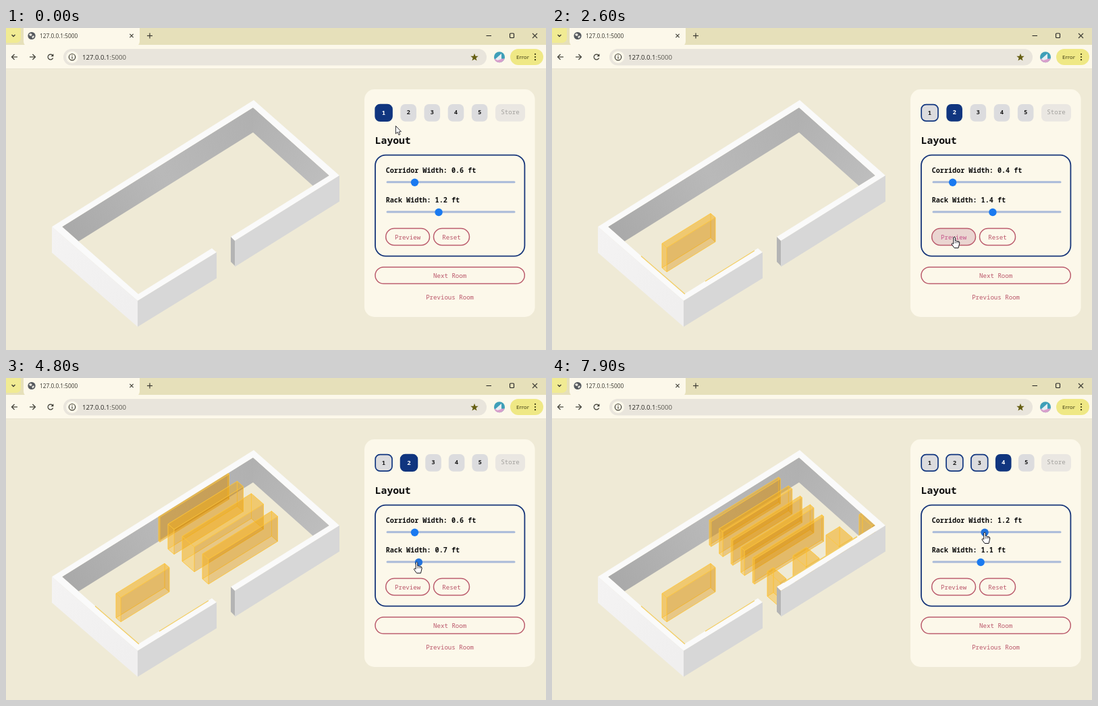
Recreate the animation shown at these times as an HTML page with a canvas. Size 800 by 478 pixels, loop 8 s.

```html
<!DOCTYPE html>
<html lang="en">
<head>
<meta charset="utf-8">
<title>Layout</title>
<style>
html, body { margin: 0; width: 800px; height: 478px; overflow: hidden; background: #efead6; }
canvas { display: block; width: 800px; height: 478px; }
</style>
</head>
<body>
<canvas id="stage"></canvas>
<script>
const canvas = document.getElementById('stage');
const ctx = canvas.getContext('2d');
const ratio = window.devicePixelRatio || 1;
canvas.width = 800 * ratio;
canvas.height = 478 * ratio;

const LOOP = 8000, STEP = 100, DRAG = 200, PRESS = 200;
const MONO = '"Noto Sans Mono", "DejaVu Sans Mono", monospace';
const SANS = '"Open Sans", "Noto Sans", sans-serif';
const CREAM = '#fcf8ea', NAVY = '#10357f', ROSE = '#b95468', INK = '#3b3a32';

// Slope of the long and the short walls on screen, depth of one rack foot, aisle
const SLOPE_U = 0.62, SLOPE_V = 0.87, FOOT = 9, AISLE = 12;

const sliders = {
  corridor: { label: 'Corridor Width', y: 229, value: 0.6 },
  rack: { label: 'Rack Width', y: 273.2, value: 1.2 }
};
const buttons = {
  preview: { label: 'Preview', box: [562.7, 297.5, 64.8, 25] },
  reset: { label: 'Reset', box: [633.5, 297.5, 53, 25] },
  next: { label: 'Next Room', box: [547, 355, 221.3, 24.5] }
};

// What the user does: arrival time, control and new value, or a resting place
const script = [
  [0, [577, 145]], [400, 'rack', 0.8], [1000, 'preview'], [1300, 'next'],
  [1600, 'corridor', 1.4], [1900, 'corridor', 0.4], [2200, 'rack', 1.4], [2500, 'preview'],
  [3000, 'rack', 1], [3300, 'preview'], [3900, [690, 147]],
  [4400, 'corridor', 0.6], [4700, 'rack', 0.3], [5000, 'preview'], [5500, [659, 158]],
  [5700, 'next'], [6000, 'corridor', 0.9], [6300, 'rack', 1.1], [6600, 'preview'],
  [7000, 'next'], [7700, 'corridor', 1.2]
];

const thumbX = value => 569.9 + 59.3 * value;

// Turns the script into the pointer path and the state at time t
function play(t) {
  const path = [];
  const state = { corridor: sliders.corridor.value, rack: sliders.rack.value, room: 0, plans: [] };
  for (const [at, what, goal] of script) {
    if (sliders[what]) {
      const from = state[what], y = sliders[what].y;
      path.push([at, thumbX(from), y], [at + DRAG, thumbX(goal), y]);
      if (t > at) state[what] += (goal - from) * Math.min(1, (t - at) / DRAG);
      if (t < at + DRAG) break;
    } else if (buttons[what]) {
      const [x, y, w, h] = buttons[what].box;
      const spot = [x + w / 2 + 1, y + h / 2];
      path.push([at, ...spot], [at + PRESS, ...spot]);
      if (t < at + PRESS) break;
      if (what === 'next') state.room++;
      else state.plans[state.room] = state.rack;
    } else {
      path.push([at, ...what]);
      if (t < at) break;
    }
  }
  const i = path.findIndex(p => p[0] >= t);
  const b = i < 0 ? path[path.length - 1] : path[i];
  const a = i > 0 ? path[i - 1] : b;
  const k = a === b ? 0 : (t - a[0]) / (b[0] - a[0]);
  state.pointer = [a[1] + (b[1] - a[1]) * k, a[2] + (b[2] - a[2]) * k];
  return state;
}

function poly(points, fill, stroke, width = 1) {
  ctx.beginPath();
  points.forEach(([x, y]) => ctx.lineTo(x, y));
  ctx.closePath();
  if (fill) { ctx.fillStyle = fill; ctx.fill(); }
  if (stroke) { ctx.strokeStyle = stroke; ctx.lineWidth = width; ctx.stroke(); }
}

function line(points, color, width) {
  ctx.beginPath();
  points.forEach(([x, y]) => ctx.lineTo(x, y));
  ctx.strokeStyle = color;
  ctx.lineWidth = width;
  ctx.stroke();
}

function round(x, y, w, h, r, fill, stroke, width = 1.7) {
  ctx.beginPath();
  ctx.roundRect(x, y, w, h, r);
  if (fill) { ctx.fillStyle = fill; ctx.fill(); }
  if (stroke) { ctx.strokeStyle = stroke; ctx.lineWidth = width; ctx.stroke(); }
}

function disc(x, y, r, fill, stroke, width = 1) {
  ctx.beginPath();
  ctx.arc(x, y, r, 0, 7);
  if (fill) { ctx.fillStyle = fill; ctx.fill(); }
  if (stroke) { ctx.strokeStyle = stroke; ctx.lineWidth = width; ctx.stroke(); }
}

function cross(x, y, r) {
  line([[x - r, y - r], [x + r, y + r]], INK, 1.1);
  line([[x + r, y - r], [x - r, y + r]], INK, 1.1);
}

function text(s, x, y, font, color, align = 'left') {
  ctx.font = font;
  ctx.fillStyle = color;
  ctx.textAlign = align;
  ctx.fillText(s, x, y);
}

function shade([x0, y0], [x1, y1], ...colors) {
  const g = ctx.createLinearGradient(x0, y0, x1, y1);
  colors.forEach((c, i) => g.addColorStop(i / (colors.length - 1), c));
  return g;
}

function drawTabStrip() {
  ctx.fillStyle = '#e6e0ba';
  ctx.fillRect(0, 0, 800, 26);
  ctx.fillStyle = CREAM;
  ctx.fillRect(0, 25, 800, 35);
  ctx.fillStyle = '#e9e4d2';
  ctx.fillRect(0, 60, 800, 1);
  round(-6, -4, 28, 26, 7, '#f1eb93');
  line([[8.5, 10], [11, 12.5], [13.5, 10]], INK, 1.4);
  round(26, -8, 172, 36, 8, CREAM);

  disc(38, 11.5, 5.6, '#55595e');
  poly([[34, 9], [37, 8], [39, 10], [37, 12], [35, 11.5]], '#e7e5dd');
  poly([[38, 13], [41, 11], [42, 13], [39.5, 15.5]], '#e7e5dd');
  text('127.0.0.1:5000', 50, 14.6, '8.3px ' + SANS, '#33322b');
  cross(186, 11.5, 2.6);
  line([[209, 11.5], [217, 11.5]], INK, 1.2);
  line([[213, 7.5], [213, 15.5]], INK, 1.2);
  line([[711.5, 11.5], [719, 11.5]], '#222', 1);
  round(746.5, 8, 6, 6.5, 1, null, '#222', 1.1);
  cross(783.5, 11.5, 3.5);
}

function arrow(x, dir) {
  line([[x - 4.2 * dir, 43], [x + 4.2 * dir, 43]], INK, 1.2);
  line([[x + 0.2 * dir, 39], [x + 4.2 * dir, 43], [x + 0.2 * dir, 47]], INK, 1.2);
}

function drawToolbar() {
  arrow(12.7, -1);
  arrow(39.2, 1);
  ctx.beginPath();
  ctx.arc(66, 43, 3.9, 0.4, 5.5);
  ctx.strokeStyle = INK;
  ctx.lineWidth = 1.2;
  ctx.stroke();
  poly([[70.4, 38.2], [70.4, 42.2], [66.4, 42.2]], INK);

  round(85, 31, 627, 24.5, 12.2, '#e9e5dc');
  disc(98, 43.2, 9, CREAM);
  disc(98, 43.2, 4.7, null, INK, 1.2);
  line([[98, 42.5], [98, 45.8]], INK, 1.2);
  disc(98, 40.9, 0.7, INK);
  text('127.0.0.1', 113, 46.6, '9.6px ' + SANS, '#24231f');
  const w = ctx.measureText('127.0.0.1').width;
  text(':5000', 113 + w, 46.6, '9.6px ' + SANS, '#55534b');

  const star = Array.from({ length: 10 }, (_, i) => {
    const a = i * Math.PI / 5 - Math.PI / 2, r = i % 2 ? 2.5 : 6;
    return [694 + r * Math.cos(a), 43.7 + r * Math.sin(a)];
  });
  poly(star, '#655e13');

  disc(731, 43.2, 8, '#3f9fb8');
  ctx.beginPath();
  ctx.arc(731, 43.2, 8, 0.3, 2.8);
  ctx.fillStyle = '#d9a0cc';
  ctx.fill();
  poly([[725, 46], [734, 38], [734, 46], [728, 48]], '#e8edf2');

  round(747, 31, 49, 24, 12, '#efe885');
  text('Error', 756, 46, '8px ' + SANS, '#33310c');
  for (let i = -1; i < 2; i++) disc(784, 43 + 4.2 * i, 1.1, '#33310c');
}

// x, y: nearest upper corner; len runs along the long wall, depth away from it
function rack(x, y, len, depth, h) {
  const at = (u, v, z) => [x + u * len - v * depth,
    y - u * len * SLOPE_U - v * depth * SLOPE_V + z * h];
  const face = (fill, ...corners) =>
    poly(corners.map(c => at(...c)), fill, 'rgba(255,200,60,.6)', 0.9);
  const side = 'rgba(215,138,0,.3)', light = 'rgba(255,190,40,.34)';
  face('rgba(215,138,0,.1)', [0, 0, 1], [1, 0, 1], [1, 1, 1], [0, 1, 1]);
  face(side, [0, 1, 0], [1, 1, 0], [1, 1, 1], [0, 1, 1]);
  face(side, [1, 0, 0], [1, 1, 0], [1, 1, 1], [1, 0, 1]);
  face(light, [0, 0, 0], [0, 1, 0], [0, 1, 1], [0, 0, 1]);
  face(side, [0, 0, 0], [1, 0, 0], [1, 0, 1], [0, 0, 1]);
  face(light, [0, 0, 0], [1, 0, 0], [1, 1, 0], [0, 1, 0]);
}

// Parallel rows, alternately single and double, packed until the back wall
function fillHall(width) {
  const back = 226, rows = [];
  for (let x = 300, i = 0; x > back; i++) {
    const depth = Math.min(FOOT * width * (1 + i % 2), x - back);
    rows.unshift([x, depth]);
    x -= depth + AISLE;
  }
  rows.forEach(([x, depth]) => rack(x, 269 + (x - 300) * SLOPE_V, 102.5, depth, 37));
}

// Short racks at an even pitch along the front wall, cut off at both ends
function fillFront() {
  for (let i = 2; i >= -1; i--) {
    const x = 376 + 49 * i;
    const left = Math.max(338, x), right = Math.min(479, x + 20);
    rack(left, 280 - (left - 376) * SLOPE_U, right - left, 19, 37);
  }
}

// Outer and inner corners of the wall tops: left, back, right, front
const outer = [[68, 295], [367, 107], [494, 219], [195, 405]];
const inner = [[83, 295], [366, 118], [479, 219], [196, 395]];
const doorLeft = [[305, 327], [312, 333]], doorRight = [[333, 310], [339, 316]];

const wall = (p, q, fill, h = 38.5) =>
  poly([p, q, [q[0], q[1] + h], [p[0], p[1] + h]], fill);

function drawRoom(plans) {
  const [left, back, right, front] = outer;
  const [inLeft, inBack, inRight, inFront] = inner;

  ctx.save();
  ctx.beginPath();
  inner.forEach(p => ctx.lineTo(...p));
  ctx.clip();
  wall(inLeft, inBack, shade(inLeft, inBack, '#a9a9a9', '#b9b9b9', '#b0b0b0'), 37);
  wall(inBack, inRight, shade(inBack, inRight, '#b0b0b0', '#bebebe'), 37);
  ctx.restore();

  if (plans[1]) fillHall(plans[1]);
  if (plans[2]) fillFront();
  if (plans[0]) rack(170, 326, 72, 7, 36);

  const top = '#fafafa';
  poly([left, back, right, inRight, inBack, inLeft], top);
  poly([left, inLeft, inFront, ...doorLeft, front], top);
  poly([doorRight[0], inRight, right, doorRight[1]], top);
  wall(left, front, shade(left, front, '#f4f3f3', '#f0efef'));
  wall(front, doorLeft[1], '#d7d7d7');
  wall(doorRight[1], right, '#d7d7d7');
  wall(...doorRight, '#b4b4b4', 37);

  const gold = '#f3cf68';
  if (plans[0]) {
    line([[132, 338.5], [197, 395]], gold, 1.4);
    line([[227, 376], [300, 330.5]], gold, 1.4);
  }
  if (plans[2]) line([[343, 303.5], [452, 235.5]], gold, 1.8);
}

function drawSteps({ room, plans }) {
  const done = i => i === 0 || plans[i] !== undefined;
  const widths = [0, 1, 2, 3, 4].map(i => done(i) ? 26.4 : 23.6);
  const gap = (222.6 - 44 - widths.reduce((a, b) => a + b)) / 5;
  let x = 546.4;
  widths.forEach((w, i) => {
    const fill = i === room ? NAVY : '#dcdcde';
    if (done(i)) round(x + 0.8, 113.6, w - 1.6, 24.6, 7, fill, NAVY);
    else round(x, 113, w, 25.8, 7, fill);
    text(i + 1, x + w / 2, done(i) ? 129.4 : 128.2, '600 9.1px ' + MONO,
      i === room ? '#fff' : '#1c1c1c', 'center');
    x += w + gap;
  });
  round(725, 113, 44, 25.8, 7, '#eae7e2');
  text('Store', 747, 128.2, '9.1px ' + MONO, '#a2a09d', 'center');
}

function drawSlider({ label, y }, raw, pointer) {
  const value = Math.round(raw * 10) / 10;
  text(`${label}: ${value.toFixed(1)} ft`, 562.7, y - 14.3, '700 10.15px ' + MONO, '#0c0c0c');
  round(563.5, y - 1.8, 191, 3, 1.5, '#a9bad9');
  disc(thumbX(value), y + 0.3, 5.7, Math.abs(pointer[1] - y) < 5 ? '#2474dc' : '#1a7af0');
}

function inside([px, py], [x, y, w, h]) {
  return px >= x && px <= x + w && py >= y && py <= y + h;
}

function drawButton({ label, box }, hover) {
  const [x, y, w, h] = box;
  round(x, y, w, h, h / 2, hover ? '#ead5d1' : null, '#bb5c6d', 1.5);
  text(label, x + w / 2, y + h / 2 + 3.6, '9.1px ' + MONO, hover ? '#c4528a' : ROSE, 'center');
}

function drawPanel(state, before) {
  round(531, 91, 252.6, 338, 15, CREAM);
  drawSteps(state);
  text('Layout', 546.8, 172.3, '700 14.7px ' + MONO, '#0c0c0c');
  round(547, 188.6, 221.4, 150, 15.5, null, '#17367a', 1.8);
  for (const name in sliders) drawSlider(sliders[name], state[name], state.pointer);
  for (const b of Object.values(buttons)) {
    drawButton(b, inside(state.pointer, b.box) && inside(before, b.box));
  }
  text('Previous Room', 657.6, 402.8, '9.1px ' + MONO, ROSE, 'center');
}

function drawPointer([x, y]) {
  const onSlider = Object.values(sliders).some(s => inside([x, y], [562, s.y - 6, 194, 12]));
  const onButton = Object.values(buttons).some(b => inside([x, y], b.box));
  ctx.save();
  ctx.translate(x, y);
  ctx.lineJoin = 'round';
  if (onSlider || onButton) {
    ctx.beginPath();
    ctx.moveTo(-1.3, 1);
    ctx.quadraticCurveTo(0, -1, 1.3, 1);
    ctx.lineTo(1.3, 6);
    ctx.quadraticCurveTo(3, 5, 3.8, 6.6);
    ctx.quadraticCurveTo(7.8, 6, 7.8, 9);
    ctx.lineTo(6, 16.5);
    ctx.lineTo(0, 16.5);
    ctx.lineTo(-4, 11);
    ctx.quadraticCurveTo(-4, 8.6, -1.3, 10.4);
    ctx.closePath();
    ctx.fillStyle = '#fff';
    ctx.fill();
    ctx.strokeStyle = '#16161c';
    ctx.lineWidth = 1;
    ctx.stroke();
    for (let i = 0; i < 3; i++) line([[1.3 + 2.3 * i, 7], [1.3 + 2.3 * i, 9.5]], '#16161c', 0.7);
  } else {
    poly([[0.4, 0.4], [0.4, 12], [3, 9.5], [5, 13.8], [6.8, 13], [5, 9], [8.4, 8.8]],
      '#fff', '#16161c', 0.9);
  }
  ctx.restore();
}

function draw(t) {
  ctx.setTransform(ratio, 0, 0, ratio, 0, 0);
  ctx.fillStyle = '#efead6';
  ctx.fillRect(0, 0, 800, 478);
  const state = play(t);
  drawTabStrip();
  drawToolbar();
  drawRoom(state.plans);
  drawPanel(state, play(Math.max(0, t - STEP)).pointer);
  drawPointer(state.pointer);
}

const start = performance.now();
function tick() {
  const t = (performance.now() - start) % LOOP;
  draw(Math.floor(t / STEP) * STEP);
  requestAnimationFrame(tick);
}
tick();
</script>
</body>
</html>
```
